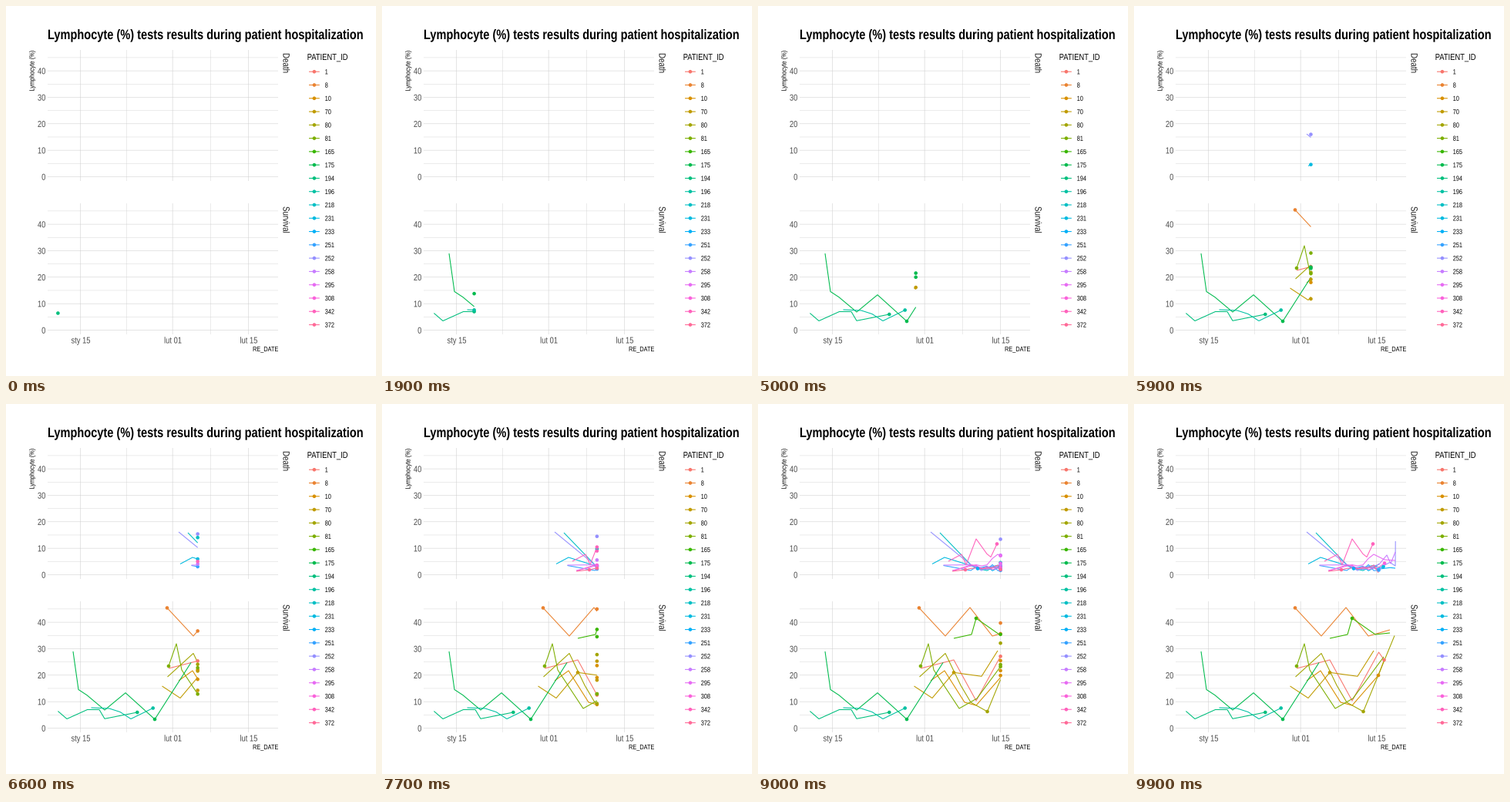
These frames come from a looping animation (480x480 px, 10 s). A matplotlib script:

```python
import numpy as np
import matplotlib.pyplot as plt
from matplotlib.animation import FuncAnimation
from matplotlib.patches import Circle, PathPatch
from matplotlib.textpath import TextPath
from matplotlib.transforms import Affine2D

plt.rcParams["path.snap"] = False

SIZE, FRAMES = 480, 100
X0, X1 = 67.4, 339.3
STEP = (X1 - X0) / (FRAMES - 1)
DAY, JAN15 = 7.03, 96.6
CONDENSED = 0.815  # narrow cut of the sans face

COLORS = dict(zip(
    (1, 8, 10, 70, 80, 81, 165, 175, 194, 196,
     218, 231, 233, 251, 252, 258, 295, 308, 342, 372),
    "#F8766D #EA8331 #D89000 #C09B00 #A3A500 #7CAE00 #39B600 #00BB4E "
    "#00BF7D #00C1A3 #00BFC4 #00BAE0 #00B0F6 #35A2FF #9590FF #C77CFF "
    "#E76BF3 #FA62DB #FF62BC #FF6A98".split()))

# Each test belongs to the dot named by its letter ("." = no dot, the last
# letter repeats). Capital dots stay where they end; the others run on to the
# patient's last test and vanish.
SURVIVAL = {
    1: ("A", [(211, 343), (254, 332), (283, 385), (317.5, 322),
              (324.5, 332)]),
    8: ("Abbcc", [(209, 264.5), (243, 301), (275, 264), (304, 301),
                  (332, 293)]),
    10: ("AbccAb", [(224, 359), (242, 346), (268, 387), (283, 391),
                    (317, 352), (325, 331)]),
    70: ("abCba", [(202.5, 366), (226, 381.5), (254, 348.3), (290, 353.3),
                   (311, 320)]),
    80: ("a.BBBa", [(209.5, 354), (243, 323.5), (263, 365), (276, 387),
                    (297.5, 399), (338, 300.5)]),
    81: ("Abccb", [(211, 340), (221, 311), (228, 345), (261, 395),
                   (284, 382), (324, 328)]),
    165: ("aBBa", [(254, 304), (277, 299), (283, 278), (313, 299),
                   (332, 297)]),
    175: ("..a.bCa", [(87, 321), (94, 370.5), (105, 377.7), (128, 397),
                      (155, 374.7), (193, 409), (240, 335.5)]),
    194: ("A", [(67.4, 398.5), (79, 408.5), (105.5, 396.5), (121, 396.5),
                (128, 408.3), (170.3, 400)]),
    196: ("A", [(110.5, 394), (134, 395), (148, 399.5), (162, 408.5),
                (190.7, 394.5)]),
}
# First and last tests; the low plateau between them is filled in by rule
DEATH = {
    218: ("ab", [(236, 167), (276, 208.5)], [(318, 207.5)]),
    231: ("A", [(226, 207.5), (242, 199)], [(323.5, 211)]),
    233: ("Ab", [(285, 213.5)], [(339, 213)]),
    251: ("A", [(240.5, 209.5)], [(317.5, 215.5)]),
    252: ("ab", [(224, 166), (274, 207)],
          [(332, 205.5), (339, 210), (339.2, 178)]),
    258: ("ab", [(240.5, 209)],
          [(318, 208), (328, 196), (333, 207), (339, 192)]),
    295: ("ab", [(252, 216)],
          [(304, 200.5), (311, 195), (325, 202), (339, 203)]),
    308: ("A", [(253, 216.5)], [(325, 206.5)]),
    342: ("AbA", [(247, 204), (264, 195), (270, 208.5)],
          [(283, 175), (297, 194.5), (302, 198.5), (310, 181.5)]),
    372: (".Ab", [(252, 217), (269, 215)], [(317, 219)]),
}


def plateau(first, last, rng):
    days = np.arange(276, 339, DAY)
    gap = (days > first[-1][0] + 5) & (days < last[0][0] - 5)
    days = days[gap & (rng.random(len(days)) < 0.7)]
    mid = [(x, rng.uniform(208, 217)) for x in days]
    return first + mid + last


rng = np.random.default_rng(4)
patients = dict(SURVIVAL)
for pid, (code, first, last) in DEATH.items():
    patients[pid] = code, plateau(first, last, rng)

fig = plt.figure(figsize=(SIZE / 72, SIZE / 72), dpi=72, facecolor="white")
ax = fig.add_axes([0, 0, 1, 1])
ax.set(xlim=(0, SIZE), ylim=(SIZE, 0))
ax.axis("off")


def text(s, x, y, size, align=0.0, turn=0, color="black", weight="normal"):
    prop = {"family": "Liberation Sans", "weight": weight}
    path = TextPath((0, 0), s, size=size, prop=prop)
    width = path.get_extents().x1 * CONDENSED
    place = (Affine2D().scale(CONDENSED, -1).translate(-align * width, 0)
             .rotate_deg(turn).translate(x, y))
    ax.add_patch(PathPatch(place.transform_path(path), fc=color, lw=0))


def rule(xs, ys, major):
    ax.plot(xs, ys, color="#cccccc", lw=0.5 if major else 0.38, zorder=1,
            solid_capstyle="butt")


def add_dot(color, x=0, y=0):
    return ax.add_patch(Circle((x, y), 2.3, fc=color, lw=0, zorder=3))


def panel(top, label):
    for pct in range(0, 50, 5):
        y = top + 164.5 - 3.435 * pct
        major = pct % 10 == 0
        rule((54, 353), (y, y), major)
        if major:
            text(str(pct), 51, y + 4.2, 11.5, 1, color="#4d4d4d")
    for day in (0, 8.5, 17, 24, 31):
        x = JAN15 + DAY * day
        rule((x, x), (top, top + 170), day not in (8.5, 24))
    text(label, 359.5, top + 4, 12, turn=90, color="#1a1a1a")


panel(57, "Death")
panel(256, "Survival")
text("Lymphocyte (%) tests results during patient hospitalization",
     54, 43, 17.9, weight="bold")
text("Lymphocyte (%)", 36.5, 110.5, 9, turn=-90)
text("RE_DATE", 353, 448, 9, 1)
for name, day in (("sty 15", 0), ("lut 01", 17), ("lut 15", 31)):
    text(name, JAN15 + DAY * day + 0.2, 437.5, 11.5, 0.5, color="#4d4d4d")

text("PATIENT_ID", 390.7, 70, 11.5)
for k, (pid, color) in enumerate(COLORS.items()):
    y = 85.2 + 17.28 * k
    ax.plot((393, 406.8), (y, y), color=color, lw=1.07,
            solid_capstyle="butt")
    add_dot(color, 399.9, y)
    text(str(pid), 413.7, y + 3.2, 9)


def tracks(code, pts):
    code = code.ljust(len(pts), code[-1])
    for letter in sorted(set(code) - {"."}):
        path = [p for c, p in zip(code, pts) if c == letter]
        stays = letter.isupper()
        if not stays and path[-1] != pts[-1]:
            path.append(pts[-1])
        yield np.array(path, float), stays


lines, dots = [], []
for pid, (code, pts) in patients.items():
    line, = ax.plot([], [], color=COLORS[pid], lw=1.07, zorder=2.5,
                    solid_capstyle="butt", solid_joinstyle="round")
    lines.append((line, np.array(pts, float)))
    for path, stays in tracks(code, pts):
        dots.append((add_dot(COLORS[pid]), path, stays))


def revealed(pts, head):
    x, y = pts.T
    seen = pts[x <= head]
    if 0 < len(seen) < len(pts):
        seen = np.vstack([seen, (head, np.interp(head, x, y))])
    return seen


def dot_at(pts, head):
    x, y = pts.T
    near = np.abs(x - head).argmin()
    if abs(x[near] - head) <= STEP / 2:
        return x[near], y[near]
    return np.clip(head, x[0], x[-1]), np.interp(head, x, y)


def draw(i):
    head = X0 + STEP * i
    for line, pts in lines:
        line.set_data(*revealed(pts, head).T)
    for dot, pts, stays in dots:
        begun = head >= pts[0, 0] - STEP / 2
        dot.set_visible(begun and (stays or head < pts[-1, 0]))
        dot.center = dot_at(pts, head)
    return [line for line, _ in lines] + [d[0] for d in dots]


anim = FuncAnimation(fig, draw, frames=FRAMES, interval=100,
                     repeat=True, repeat_delay=0)
plt.show()
```
